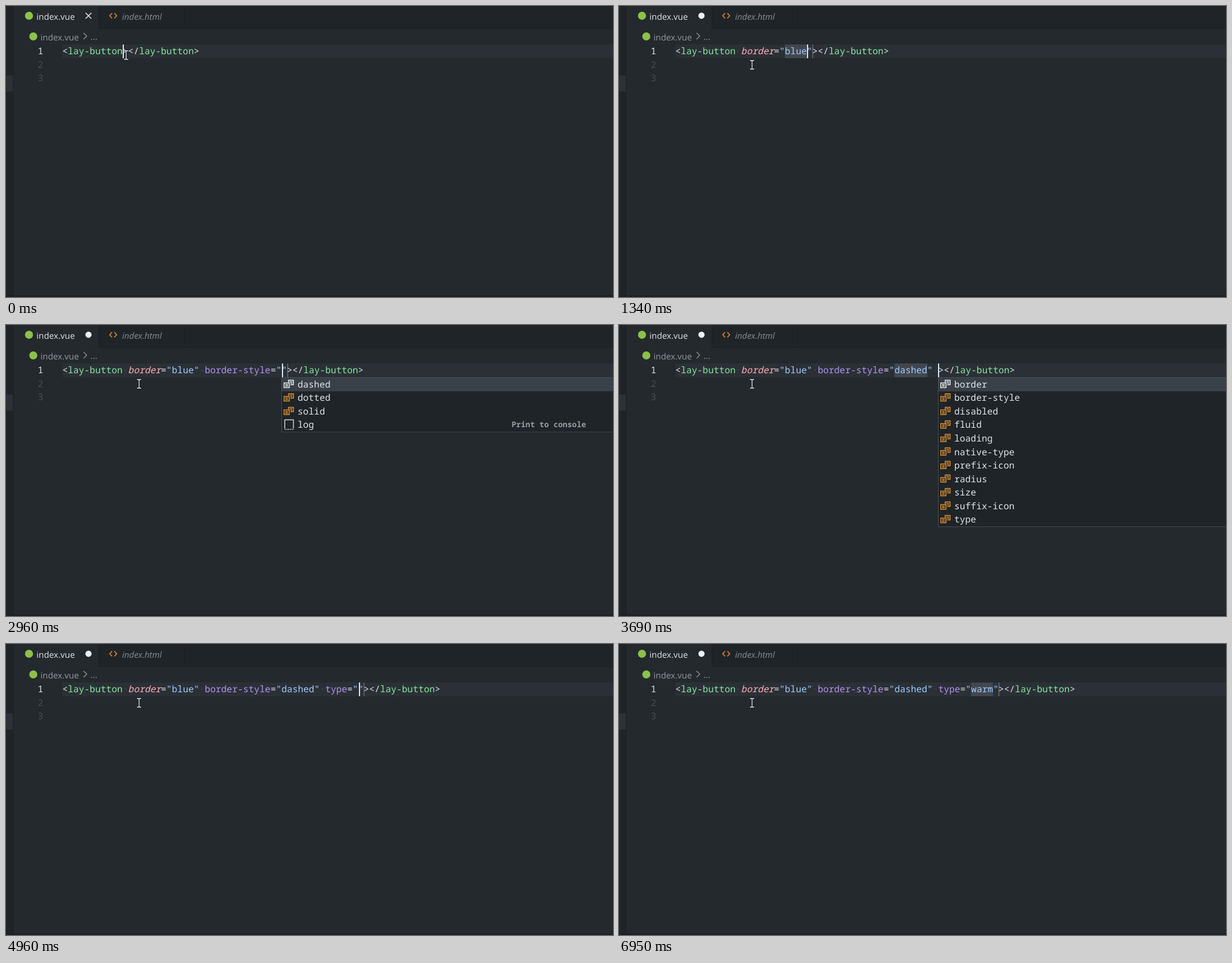
An HTML page for the animation above (7.15 s loop, 1056 px wide and 507 px high).

```html
<!DOCTYPE html>
<html lang="en">
<head>
<meta charset="utf-8">
<title>Editor completion</title>
<style>
  html, body { margin: 0; width: 100%; height: 100%; overflow: hidden; background: #24292e; }
  svg { display: block; text-rendering: geometricPrecision; }
  .ui { font: 14.9px "Open Sans", "Noto Sans", sans-serif; }
  .code { font: 15.88px "Noto Sans Mono", "DejaVu Sans Mono", monospace; fill: #e1e4e8; }
  .tag { fill: #85e89d; }
  .str { fill: #9ecbff; }
  .attr { fill: #b392f0; }
  .odd { fill: #fdaeb7; font-style: italic; }
  .dim { fill: #444d56; }
  .item { font-weight: 500; }
  .detail { font-size: 13.5px; font-weight: 600; fill: #959da5; }
</style>
</head>
<body>
<svg width="1056" height="507" viewBox="0 0 1056 507">
  <defs>
    <g id="value" fill="none" stroke="currentColor" stroke-width="1.5">
      <path d="M8.5 4.5V.8H17v7.7h-5M10.5 3.5h4.5M12 6h3" />
      <path d="M.8 5.5h9v8h-9zM3 8.3h4.7M3 10.8h4.7" />
    </g>
    <g id="snippet" fill="none" stroke="#d1d5da" stroke-width="1.5">
      <path d="M2 14V-.8H17V14" />
      <path d="M1.5 15.6H18" stroke-dasharray="2 1.2" />
    </g>
  </defs>

  <rect width="1056" height="507" fill="#24292e" />
  <path d="M0 0H12V507H0zM162 0H1056V39H162z" fill="#1f2428" />
  <rect y="121" width="12" height="28" fill="#2c3137" />
  <path d="M12.5 0V507M161.5 0V39M310.5 0V39M162 39.5H1056" stroke="#1b1f23" fill="none" />
  <rect y="504" width="1056" height="3" fill="#1e1f25" />

  <g fill="#8dc149"><circle cx="40" cy="17" r="7" /><circle cx="47.5" cy="53" r="7" /></g>
  <g class="ui">
    <text x="53" y="24" fill="#e1e4e8">index.vue</text>
    <text x="202" y="24" fill="#84908f" font-style="italic">index.html</text>
    <text x="60" y="60" fill="#919a9f">index.vue</text>
    <text x="147" y="59" fill="#919a9f">...</text>
  </g>
  <path d="M135 47l5.5 5.5-5.5 5.5" fill="none" stroke="#919a9f" stroke-width="1.3" />
  <path d="M184.5 12.5L180.5 17l4 4.5M188.5 12.5l4 4.5-4 4.5" fill="none" stroke="#d9822b" stroke-width="1.8" />
  <path id="close" d="M138.5 12l10 10m0-10l-10 10" stroke="#e1e4e8" stroke-width="1.7" />
  <circle id="dirty" cx="143.5" cy="17" r="5.4" fill="#f0f2f4" />

  <rect x="98" y="67" width="958" height="24" fill="#2b3036" />
  <g class="code">
    <text x="55.3" y="84">1</text>
    <text x="55.3" y="108" class="dim">2</text>
    <text x="55.3" y="131" class="dim">3</text>
  </g>
  <g id="editor"></g>
  <g id="mouse" fill="none">
    <path d="M-3.5-7.5h2.5l1 1 1-1h2.5M0-6.5v13M-3.5 7.5h2.5l1-1 1 1h2.5" stroke="#101315" stroke-width="3" />
    <path d="M-3.5-7.5h2.5l1 1 1-1h2.5M0-6.5v13M-3.5 7.5h2.5l1-1 1 1h2.5" stroke="#f4f4f4" stroke-width="1.3" />
  </g>
</svg>
<script>
const LOOP = 7150, LEFT = 98, CHAR = 9.53, ROW = 23.55;
const $ = id => document.getElementById(id);
const colX = col => LEFT + col * CHAR;

// A leading * marks a snippet entry.
const props = ['border', 'border-style', 'disabled', 'fluid', 'loading', 'native-type',
  'prefix-icon', 'radius', 'size', 'suffix-icon', 'type'];
const colors = ['blue', 'green', 'orange', 'red', '*log'];
const styles = ['dashed', 'dotted', 'solid', '*log'];
const types = ['danger', 'normal', 'primary', 'warm', '*log'];
const matches = ['type', 'native-type', 'border-style', 'suffix-icon', '*template', '*ternary',
  '*test', '*this', '*throw', '*timeout', '*toString', '*true', '*try'];

const blue = ' border="blue"';
const dashed = blue + ' border-style="dashed"';
const typed = dashed + ' type=""';
const at = (list, col, sel = 0) => ({ list, col, sel });

// Each step: time, attributes, caret column, then optional marks and popup.
const steps = [
  [0, '', 11],
  [270, ' ', 12],
  [340, ' ', 12, { menu: at(props, 12) }],
  [410, ' border', 18],
  [670, ' border=""', 20, { mark: [20, 20], stop: 21 }],
  [940, ' border=""', 20, { mark: [20, 20], stop: 21, menu: at(colors, 20) }],
  [1340, blue, 24, { mark: [20, 24], stop: 25 }],
  [1670, blue, 25, { mark: [20, 24] }],
  [1740, blue + ' ', 26, { mark: [20, 24] }],
  [1810, blue + ' ', 26, { mark: [20, 24], menu: at(props, 26) }],
  [2010, blue + ' ', 26, { mark: [20, 24], menu: at(props, 26, 1) }],
  [2210, blue + ' border-style', 38, { mark: [20, 24] }],
  [2280, blue + ' border-style=""', 40, { mark: [20, 24] }],
  [2410, blue + ' border-style=""', 40, { mark: [40, 40], stop: 41 }],
  [2540, blue + ' border-style=""', 40, { mark: [40, 40], stop: 41, menu: at(styles, 40) }],
  [2750, blue + ' border-style=""', 40, { mark: [40, 40], stop: 41, menu: at(styles, 40, 1) }],
  [2960, blue + ' border-style=""', 40, { mark: [40, 40], stop: 41, menu: at(styles, 40) }],
  [3230, dashed, 46, { mark: [40, 46], stop: 47 }],
  [3430, dashed, 47, { mark: [40, 46] }],
  [3690, dashed + ' ', 48, { mark: [40, 46], menu: at(props, 48) }],
  [3970, dashed + ' t', 49, { mark: [40, 46], menu: at(props, 48) }],
  [4100, dashed + ' t', 49, { mark: [40, 46], menu: at(matches, 48) }],
  [4490, dashed + ' type', 52, { mark: [40, 46] }],
  [4830, typed, 54, { mark: [40, 46] }],
  [4960, typed, 54, { mark: [54, 54], stop: 55 }],
  [5360, typed, null, { mark: [54, 54], stop: 55, menu: at(types, 54) }],
  [5490, typed, 54, { mark: [54, 54], stop: 55, menu: at(types, 54) }],
  [5690, typed, 54, { mark: [54, 54], stop: 55, menu: at(types, 54, 1) }],
  [5950, typed, null, { mark: [54, 54], stop: 55, menu: at(types, 54, 2) }],
  [6150, typed, null, { mark: [54, 54], stop: 55, menu: at(types, 54, 3) }],
  [6350, typed, 54, { mark: [54, 54], stop: 55, menu: at(types, 54, 3) }],
  [6680, dashed + ' type="warm"', 58, { mark: [54, 58], stop: 59 }],
  [6950, dashed + ' type="warm"', null, { mark: [54, 58], stop: 59 }]
];

const rect = (x, y, w, h, fill) =>
  `<rect x="${x}" y="${y}" width="${w}" height="${h}" fill="${fill}"/>`;

function codeLine(attrs) {
  let col = 0;
  let out = '';
  const put = (text, cls = '') => {
    const safe = text.replace(/</g, '&lt;').replace(/>/g, '&gt;');
    out += `<text class="${cls}" x="${colX(col)}" y="84">${safe}</text>`;
    col += text.length;
  };
  put('<');
  put('lay-button', 'tag');
  for (const [part] of attrs.matchAll(/ |=|"[^"]*"|[\w-]+/g)) {
    if (part === ' ') put('·', 'dim');
    else if (part[0] === '"') put(part, 'str');
    else if (part === '=' || !attrs.includes(part + '=')) put(part);
    else put(part, part === 'border' ? 'odd' : 'attr');
  }
  put('></');
  put('lay-button', 'tag');
  put('>');
  return `<g class="code">${out}</g>`;
}

function popup({ list, col, sel }) {
  const x = Math.round(colX(col));
  const h = Math.min(list.length, 12.4) * ROW + 2;
  let out = rect(0, 0, 1100, h, '#1f2428') + rect(0, 1, 1100, 0, 'none');
  list.forEach((name, i) => {
    const y = 1 + i * ROW;
    const snippet = name[0] === '*';
    if (i === sel) out += rect(1, y, 1100, ROW, '#3a4048');
    out += `<use href="#${snippet ? 'snippet' : 'value'}" x="4" y="${y + 3.5}" color="${i === sel ? '#f0f2f4' : '#e2932e'}"/>`;
    out += `<text class="item" x="28.3" y="${y + 16.8}">${name.replace('*', '')}</text>`;
    if (name === '*log') out += `<text class="detail" x="400.5" y="${y + 15.3}">Print to console</text>`;
  });
  out += `<rect x=".5" y=".5" width="1100" height="${h - 1}" fill="none" stroke="#444d56"/>`;
  return `<svg class="code" x="${x}" y="91" width="${1056 - x}" height="${h}" overflow="hidden">${out}</svg>`;
}

function draw([time, attrs, caret, { mark, stop, menu } = {}]) {
  const empty = mark && mark[0] === mark[1];
  let out = '';
  if (mark) {
    const x = colX(mark[0]) + (empty ? 1 : 0);
    out += rect(x, 67, Math.max(2, (mark[1] - mark[0]) * CHAR), 24, '#42474e');
  }
  if (stop) out += rect(Math.round(colX(stop)), 67, 2, 24, '#575b60');
  out += codeLine(attrs);
  if (caret !== null) out += rect(Math.round(colX(caret)) + (empty ? 1 : 0), 67, 2, 24, '#dbe7f4');
  if (menu) out += popup(menu);
  $('editor').innerHTML = out;
  $('close').style.display = time < 270 ? '' : 'none';
  $('dirty').style.display = time < 270 ? 'none' : '';
}

let shown = -1;
const start = performance.now();
function tick() {
  const t = (performance.now() - start) % LOOP;
  let i = steps.length - 1;
  while (steps[i][0] > t) i--;
  if (i !== shown) draw(steps[shown = i]);
  const k = t < 670 ? 0 : t < 740 ? 0.5 : 1;
  $('mouse').setAttribute('transform', `translate(${209 + 22.5 * k} ${85.5 + 17 * k})`);
  requestAnimationFrame(tick);
}
tick();
</script>
</body>
</html>
```
